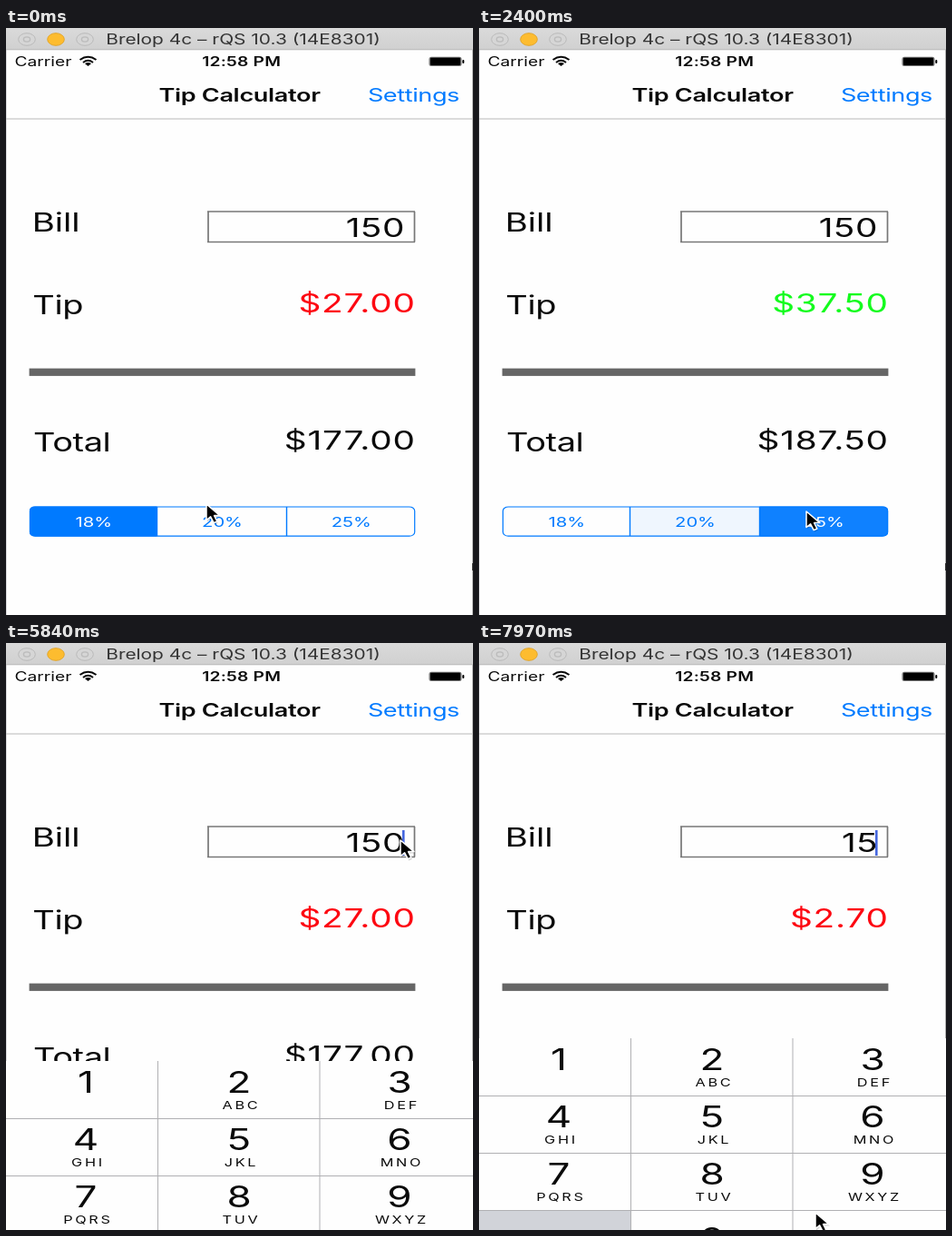
An HTML page for the animation above (8 s loop, 515 by 646 pixels).

```html
<!DOCTYPE html>
<html lang="en">
<head>
<meta charset="utf-8">
<title>Tip Calculator</title>
<style>
  html, body { margin: 0; width: 100%; height: 100%; overflow: hidden; background: #fefefe; }
  svg { display: block; }
  text { font-family: Inter, "Open Sans", sans-serif; white-space: pre; }
</style>
</head>
<body>
<svg id="stage" width="515" height="646" viewBox="0 0 515 646">
  <defs>
    <linearGradient id="chrome" x2="0" y2="1">
      <stop stop-color="#dadada"/><stop offset="1" stop-color="#d0d0d0"/>
    </linearGradient>
    <clipPath id="pill"><rect x="25.7" y="526.5" width="425.6" height="33" rx="6" ry="4.5"/></clipPath>
  </defs>
</svg>
<script>
const LOOP = 8000;
const WIDEN = 1.355; // the whole phone screen is shown wider than tall
const BLUE = '#007aff';
const COLUMNS = [88, 257, 434];
const RATES = [18, 20, 25];
const TIP_COLORS = ['#fd0711', '#0b12fb', '#14fb1e'];
const stage = document.getElementById('stage');

function add(tag, attrs, parent = stage) {
  const node = document.createElementNS('http://www.w3.org/2000/svg', tag);
  for (const key in attrs) node.setAttribute(key, attrs[key]);
  return parent.appendChild(node);
}
const rect = (x, y, width, height, fill, more, parent) =>
  add('rect', { x, y, width, height, fill, ...more }, parent);
const path = (d, more, parent) => add('path', { d, fill: 'none', ...more }, parent);
function text(x, y, size, content, more, parent) {
  const node = add('text', {
    transform: `translate(${x} ${y}) scale(${WIDEN} 1)`, 'font-size': size, fill: '#0a0a0a', ...more
  }, parent);
  node.textContent = content;
  return node;
}
const MIDDLE = { 'text-anchor': 'middle' };
const END = { 'text-anchor': 'end' };

function drawWindow() {
  rect(0, 0, 515, 646, '#fefefe');
  rect(0, 24, 1, 622, '#dcdce0');
  rect(514, 24, 1, 622, '#b4b4b4');
  rect(514, 589, 1, 8, '#333');
  rect(0, 0, 515, 24, 'url(#chrome)');
  rect(0, 23.3, 515, 1, '#b8b8b8');
  for (const cx of [23, 87]) {
    add('ellipse', { cx, cy: 12.5, rx: 9.3, ry: 6.8, fill: '#d6d6d6', stroke: '#bababa' });
    add('ellipse', { cx, cy: 12.5, rx: 3.6, ry: 2.6, fill: 'none', stroke: '#bcbcbc', 'stroke-width': 1.4 });
  }
  add('ellipse', { cx: 55, cy: 12.5, rx: 9.3, ry: 6.8, fill: '#fdbc2f', stroke: '#e3a62a' });
  text(261.5, 17.7, 15.4, 'Brelop 4c – rQS 10.3 (14E8301)', { ...MIDDLE, fill: '#333' });
}

function drawBars() {
  text(9.5, 42, 14.2, 'Carrier');
  const wave = { stroke: '#0a0a0a', 'stroke-width': 2 };
  path('M81.5 35 Q90.5 28.5 99.5 35', wave);
  path('M85 38 Q90.5 33.6 96 38', wave);
  path('M87 39.2 Q90.5 36.8 94 39.2 L90.5 42Z', { fill: '#0a0a0a' });
  text(259.7, 42, 14.2, '12:58 PM', { ...MIDDLE, 'font-weight': 600, 'letter-spacing': '.01em' });
  rect(466.5, 31.7, 36, 10.4, '#000', { rx: 2.5, opacity: .55 });
  rect(468, 32.7, 33, 8.4, '#000', { rx: 1 });
  rect(503.3, 35, 2, 4, '#000', { rx: 1 });
  text(257.5, 81, 20, 'Tip Calculator', { ...MIDDLE, 'font-weight': 600, 'letter-spacing': '-.012em' });
  text(500, 81, 20, 'Settings', { ...END, fill: BLUE, 'letter-spacing': '-.015em' });
  rect(0, 99.5, 515, 1, '#bababa');
}

function drawForm() {
  const snug = { 'letter-spacing': '-.01em' };
  text(28.7, 224, 28.3, 'Bill');
  text(29.3, 315, 28, 'Tip', snug);
  text(30, 465.5, 28, 'Total', snug);
  path('M222 202 H451 M222 235.5 H451', { stroke: '#777', 'stroke-width': 1.4 });
  path('M223 202 V235.5 M450.5 202 V235.5', { stroke: '#777', 'stroke-width': 1.7 });
  rect(25.6, 374.6, 425.8, 8.3, '#666');
  const amount = { ...END, 'letter-spacing': '.02em' };
  return {
    bill: text(440.2, 230.4, 28.6, '', amount),
    tip: text(451.7, 313.3, 28.6, '', amount),
    total: text(451.7, 464, 28.6, '', amount),
    caret: rect(437, 206, 2.6, 28, '#4567df')
  };
}

function drawSegments() {
  const edges = [26, 166.5, 309.5, 451];
  const clip = add('g', { 'clip-path': 'url(#pill)' });
  const segments = RATES.map((rate, i) => ({
    fill: rect(edges[i], 526, edges[i + 1] - edges[i], 34, BLUE, {}, clip),
    label: text((edges[i] + edges[i + 1]) / 2 + .5, 548.8, 14.9, rate + '%', MIDDLE)
  }));
  rect(26.4, 527, 424.3, 32.2, 'none', { rx: 6, ry: 4.5, stroke: BLUE, 'stroke-width': 1.2 });
  path('M166.5 527 V559 M309.5 527 V559', { stroke: BLUE, 'stroke-width': 1.4 });
  return segments;
}

function drawKeypad() {
  const pad = add('g', {});
  rect(0, 435, 515, 260, '#fefefe', {}, pad);
  rect(0, 625, 167.5, 70, '#d1d3d9', {}, pad);
  const erase = add('g', {}, pad);
  rect(346, 625, 169, 70, '#d1d3d9', {}, erase);
  path('M422 645 H447 V664 H422 L411 654.5Z', { stroke: '#222', 'stroke-width': 2 }, erase);
  path('M0 498.5 H515 M0 561.5 H515 M0 624.5 H515 M167.5 435 V695 M346 435 V695', { stroke: '#b0b0b3' }, pad);
  ['', 'ABC', 'DEF', 'GHI', 'JKL', 'MNO', 'PQRS', 'TUV', 'WXYZ'].forEach((letters, i) => {
    const x = COLUMNS[i % 3], y = 470 + 63 * Math.floor(i / 3);
    text(x, y, 32.5, i + 1, MIDDLE, pad);
    text(x + 2.4, y + 18, 12, letters, { ...MIDDLE, 'letter-spacing': '.165em' }, pad);
  });
  text(COLUMNS[1], 667, 32.5, '0', MIDDLE, pad);
  return { pad, erase };
}

function drawCursor() {
  const cursor = add('g', {});
  const arrow = 'M0 0 V17.5 L4.6 13.8 L8.2 20.6 L11.8 19 L8.6 12.6 H15Z';
  path(arrow, { fill: '#000', opacity: .16, transform: 'translate(1 2)' }, cursor);
  path(arrow, { fill: '#000', stroke: '#fff', 'stroke-width': 1.5, 'stroke-linejoin': 'round' }, cursor);
  return cursor;
}

drawWindow();
drawBars();
const form = drawForm();
const segments = drawSegments();
const { pad, erase } = drawKeypad();
const cursor = drawCursor();

// start, end, number of steps, destination x, y
const moves = [
  [430, 560, 2, 228, 534],
  [1560, 2000, 4, 361, 532],
  [2820, 3270, 4, 113, 535],
  [4030, 4970, 8, 432, 221],
  [5120, 5290, 2, 435, 217],
  [6270, 6690, 4, 446, 400],
  [6830, 7250, 4, 371, 629],
  [7390, 7530, 2, 371, 627]
];
// time, chosen rate, fill of each segment
const choices = [
  [0, 0, [1, 0, 0]],
  [980, 0, [1, .1, 0]], [1120, 1, [.06, .94, 0]], [1260, 1, [0, 1, 0]],
  [2260, 1, [0, 1, .1]], [2400, 2, [0, .06, .94]], [2520, 2, [0, 0, 1]],
  [3430, 2, [.1, 0, 1]], [3580, 0, [.94, 0, .06]], [3730, 0, [1, 0, 0]]
];
const keypadDrop = [[0, 230], [5620, 120], [5790, 25], [5950, 0]];
const caretShown = [[0, 0], [5450, 1], [6550, 0], [7110, 1], [7680, 0], [7820, 1]];
const bills = [[0, 150], [7970, 15]];
const erasing = [[0, 0], [7820, 1]];

const at = (table, t) => table.findLast(row => row[0] <= t);
const ease = p => p * p * (3 - 2 * p);
const money = value => '$' + value.toFixed(2);

function cursorAt(t) {
  let x = 221, y = 524;
  for (const [start, end, steps, toX, toY] of moves) {
    if (t < start) break;
    const step = Math.floor((t - start) / (end - start) * (steps - 1) + 1e-6) + 1;
    const p = ease(Math.min(1, step / steps));
    x += (toX - x) * p;
    y += (toY - y) * p;
  }
  return `translate(${x} ${y})`;
}

function render(t) {
  const [, choice, fills] = at(choices, t);
  const bill = at(bills, t)[1];
  const tip = bill * RATES[choice] / 100;
  form.bill.textContent = bill;
  form.tip.textContent = money(tip);
  form.tip.setAttribute('fill', TIP_COLORS[choice]);
  form.total.textContent = money(bill + tip);
  form.caret.setAttribute('opacity', at(caretShown, t)[1]);
  segments.forEach(({ fill, label }, i) => {
    fill.setAttribute('opacity', fills[i]);
    label.setAttribute('fill', fills[i] > .5 ? '#fff' : BLUE);
  });
  pad.setAttribute('transform', `translate(0 ${at(keypadDrop, t)[1]})`);
  erase.setAttribute('opacity', 1 - at(erasing, t)[1]);
  cursor.setAttribute('transform', cursorAt(t));
}

const began = performance.now();
function tick() {
  render((performance.now() - began) % LOOP);
  requestAnimationFrame(tick);
}
tick();
</script>
</body>
</html>
```
